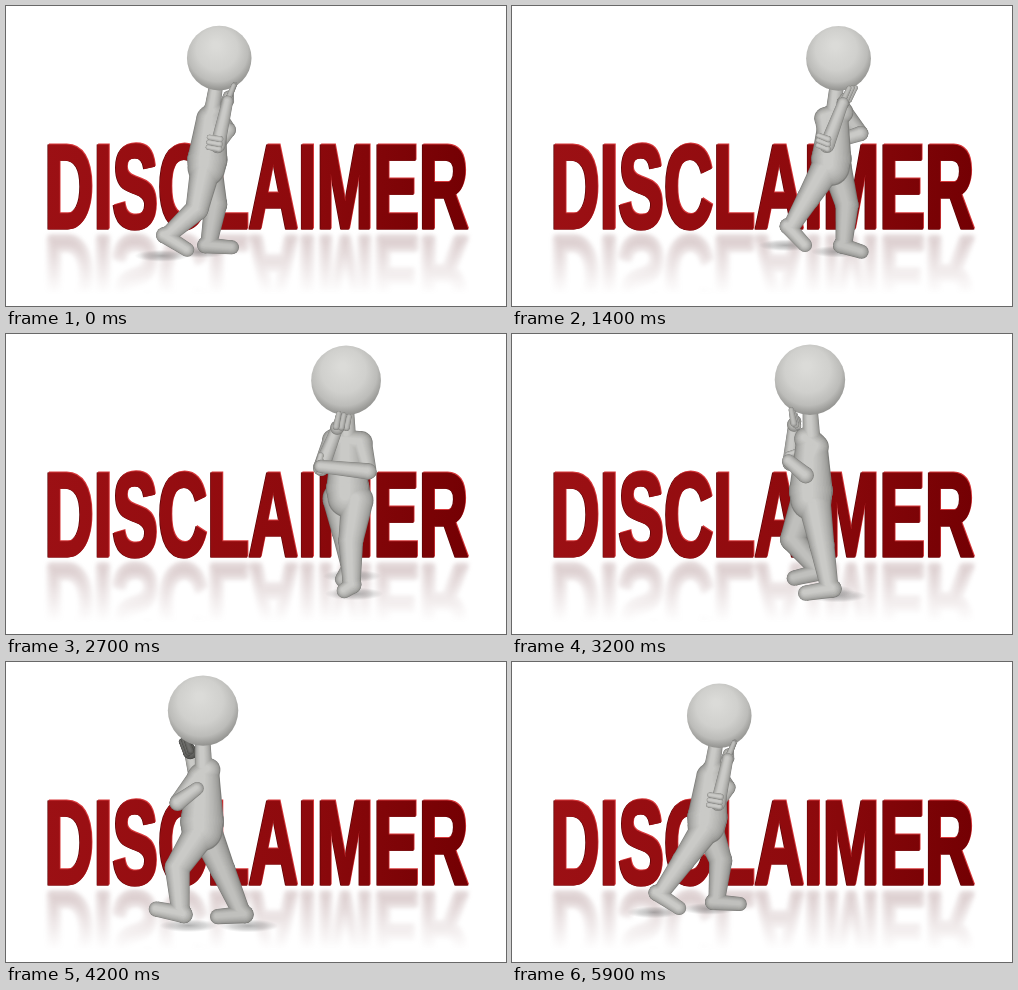
These frames come from a looping animation (500x300 px, 6 s). An HTML page with a canvas:

```html
<!DOCTYPE html>
<html lang="en">
<head>
<meta charset="utf-8">
<title>Disclaimer</title>
<style>
  html, body { margin: 0; width: 100%; height: 100%; overflow: hidden; background: #fff; }
  canvas { display: block; }
</style>
</head>
<body>
<canvas id="stage" width="500" height="300"></canvas>
<script>
const LOOP = 6000, STEP = 100, STRIDE = 1500;
const ctx = document.getElementById('stage').getContext('2d');

// time, pelvis x, ground y, scale, heading in degrees (0 right, 90 to viewer), lean
const PATH = [
  [0, 200, 250, 1, 8, 13],
  [900, 271, 248, 1, 8, 14],
  [1500, 328, 248.5, 1.005, 50, 9],
  [1900, 362, 250, 1.015, 103, 3],
  [2300, 363, 253, 1.045, 104, 4],
  [2700, 342, 257, 1.08, 107, 6],
  [3200, 299, 263, 1.09, 158, 1],
  [3600, 258, 266, 1.1, 186, -2],
  [4200, 196, 263, 1.09, 200, -1],
  [4600, 160, 257, 1.06, 235, 2],
  [4900, 147, 253, 1.03, 280, 6],
  [5200, 149, 251, 1.01, 328, 10],
  [5500, 165, 250, 1, 355, 12],
  [5900, 194, 250.5, 1, 367, 13]
];

function keyAt(i) {
  const n = PATH.length, turn = Math.floor(i / n);
  const k = PATH[i - turn * n].slice();
  k[0] += turn * LOOP;
  k[4] += turn * 360;
  return k;
}

// Smooth cyclic interpolation through the path keys
function walkerAt(t) {
  let i = PATH.length - 1;
  while (PATH[i][0] > t) i--;
  const [a, b, c, d] = [-1, 0, 1, 2].map(o => keyAt(i + o));
  const span = c[0] - b[0], q = (t - b[0]) / span;
  const [x, ground, scale, heading, lean] = [1, 2, 3, 4, 5].map(j => {
    const m0 = (c[j] - a[j]) / (c[0] - a[0]) * span;
    const m1 = (d[j] - b[j]) / (d[0] - b[0]) * span;
    const rise = c[j] - b[j];
    return b[j] + q * (m0 + q * (3 * rise - 2 * m0 - m1 + q * (m0 + m1 - 2 * rise)));
  });
  return { x, ground, scale, heading: heading * Math.PI / 180, lean };
}

function makeLayer(paint) {
  const layer = document.createElement('canvas');
  layer.width = 500;
  layer.height = 300;
  paint(layer.getContext('2d'));
  return layer;
}

function word(g, dx, dy, fill, flip = 1) {
  g.save();
  g.translate(38.4 + dx, (flip > 0 ? 221.5 : 231) + dy);
  g.scale(1, 1.74 * flip);
  g.font = 'bold 68.1px "Liberation Sans", Arial, sans-serif';
  g.fillStyle = g.strokeStyle = fill;
  g.lineWidth = 1.8;
  g.fillText('DISCLAIMER', 0, 0);
  g.strokeText('DISCLAIMER', 0, 0);
  g.restore();
}

const backdrop = makeLayer(g => {
  const mirror = makeLayer(m => {
    m.filter = 'blur(2.5px)';
    word(m, 0, 0, '#8e6264', -0.95);
    m.filter = 'none';
    m.globalCompositeOperation = 'destination-in';
    const fade = m.createLinearGradient(0, 228, 0, 288);
    fade.addColorStop(0, 'rgba(0,0,0,.34)');
    fade.addColorStop(.5, 'rgba(0,0,0,.17)');
    fade.addColorStop(1, 'rgba(0,0,0,0)');
    m.fillStyle = fade;
    m.fillRect(0, 0, 500, 300);
  });
  g.fillStyle = '#fff';
  g.fillRect(0, 0, 500, 300);
  g.drawImage(mirror, 0, 0);
  const red = g.createLinearGradient(0, -48, 420, 0);
  red.addColorStop(0, '#9c1014');
  red.addColorStop(.6, '#8e0a0d');
  red.addColorStop(1, '#740003');
  word(g, -.7, .7, '#5c0406');
  word(g, .8, -.8, '#d8383a');
  word(g, 0, 0, red);
});

function cone(a, b, ra, rb) {
  const len = Math.hypot(b.x - a.x, b.y - a.y) || 1;
  const nx = (a.y - b.y) / len, ny = (b.x - a.x) / len;
  ctx.beginPath();
  ctx.arc(a.x, a.y, ra, 0, 7);
  ctx.fill();
  ctx.beginPath();
  ctx.arc(b.x, b.y, rb, 0, 7);
  ctx.fill();
  ctx.beginPath();
  ctx.moveTo(a.x + nx * ra, a.y + ny * ra);
  ctx.lineTo(b.x + nx * rb, b.y + ny * rb);
  ctx.lineTo(b.x - nx * rb, b.y - ny * rb);
  ctx.lineTo(a.x - nx * ra, a.y - ny * ra);
  ctx.fill();
}

// Paints joined limbs in shrinking, brightening layers so that seams blend
function paintLimbs(limbs, scale, shade = 1) {
  const layers = 14;
  for (let i = 0; i < layers; i++) {
    const q = i / (layers - 1);
    const tone = Math.round((126 + 76 * q ** .45) * shade);
    ctx.fillStyle = `rgb(${tone},${tone},${tone - 3})`;
    for (const [a, b, ra, rb] of limbs) {
      const move = (p, r) => ({ x: p.x - r * scale * q * .15, y: p.y - r * scale * q * .12 });
      const size = scale * (1 - q * .75);
      cone(move(a, ra), move(b, rb), ra * size, rb * size);
    }
  }
}

function paintHead(c, r) {
  const g = ctx.createRadialGradient(c.x - r * .1, c.y - r * .4, r * .1, c.x - r * .04, c.y - r * .16, r * 1.18);
  g.addColorStop(0, '#dbdbd8');
  g.addColorStop(.5, '#d0d0cd');
  g.addColorStop(.78, '#bcbcb9');
  g.addColorStop(1, '#8e8e8b');
  ctx.fillStyle = g;
  ctx.beginPath();
  ctx.arc(c.x, c.y, r, 0, 7);
  ctx.fill();
}

function paintShadow(p, scale) {
  ctx.save();
  ctx.translate(p.x, p.y);
  ctx.scale(27 * scale, 6 * scale);
  const g = ctx.createRadialGradient(0, 0, 0, 0, 0, 1);
  g.addColorStop(0, 'rgba(80,80,80,.45)');
  g.addColorStop(.6, 'rgba(100,100,100,.25)');
  g.addColorStop(1, 'rgba(120,120,120,0)');
  ctx.fillStyle = g;
  ctx.fillRect(-1, -1, 2, 2);
  ctx.restore();
}

// Ankle offset, ankle height and heel lift for a point in the stride
function gait(phase) {
  const stance = .54;
  if (phase < stance) {
    const q = phase / stance, heel = Math.max(0, (q - .65) / .35);
    return { f: 20 - 65 * q, u: 12 + 9 * heel * heel, pitch: -.5 * heel * heel };
  }
  const q = (phase - stance) / (1 - stance), ease = q * q * (3 - 2 * q);
  return {
    f: -45 + 65 * ease,
    u: 12 + 9 * (1 - q) ** 2 + 9 * Math.sin(Math.PI * q),
    pitch: -.5 * (1 - q) ** 2 - .2 * Math.sin(2 * Math.PI * q)
  };
}

function kneeOf(hip, ankle) {
  const bone = 38, df = ankle.f - hip.f, du = ankle.u - hip.u;
  const d = Math.hypot(df, du), bend = Math.sqrt(Math.max(0, bone * bone - d * d / 4));
  return { f: hip.f + df / 2 - du / d * bend, u: hip.u + du / 2 + df / d * bend };
}

function paintWalker(t) {
  const w = walkerAt(t), s = w.scale;
  const cos = Math.cos(w.heading), sin = Math.sin(w.heading);
  const bob = 1.5 * Math.cos(4 * Math.PI * (t - 150) / STRIDE);

  // forward, right and up to screen; z grows towards the viewer
  const at = (f, r, u) => {
    const z = f * sin + r * cos;
    return { x: w.x + s * (f * cos - r * sin), y: w.ground - s * u + s * z * .3, z };
  };
  const upper = (f, r, u) => at(f + w.lean * (u - 84) / 111, r, u + bob);

  const legs = [1, -1].map(side => {
    const phase = ((t - 5775 + (side > 0 ? STRIDE / 2 : 0)) / STRIDE + 8) % 1;
    const step = gait(phase), r = side * 9;
    const hip = { f: 0, u: 86 + bob }, knee = kneeOf(hip, step);
    const c = Math.cos(step.pitch), k = Math.sin(step.pitch);
    const sole = (f, u) => at(step.f + f * c - u * k, r, step.u + f * k + u * c);
    const hipAt = at(hip.f, r, hip.u), kneeAt = at(knee.f, r, knee.u);
    const ankle = at(step.f, r, step.u);
    return {
      depth: ankle.z + hipAt.z * 4,
      shadow: at(step.f - 8, r, 1),
      limbs: [
        [hipAt, kneeAt, 15, 11.5], [kneeAt, ankle, 11.5, 8.5],
        [ankle, sole(-4, -4), 8.5, 8], [sole(-4, -4), sole(23, -5), 8, 7]
      ]
    };
  }).sort((a, b) => a.depth - b.depth);
  legs.forEach(leg => paintShadow(leg.shadow, s));

  const shoulder = side => upper(-1, side * 13, 140);
  const elbowR = upper(11, 22, 117), handR = upper(14, 5, 157);
  const elbowL = upper(15, -25, 119), handL = upper(13, 22, 119);
  const arms = [[shoulder(1), elbowR, 10.5, 7.5], [shoulder(-1), elbowL, 10.5, 7.5]];
  const isNear = arm => arm[0].z > -7;

  const body = [
    [shoulder(1), shoulder(-1), 11, 11],
    [upper(-1, 0, 136), upper(0, 0, 96), 15, 20],
    [upper(0, 0, 96), upper(0, 0, 88), 20, 19],
    [upper(-1, 0, 146), upper(0, 0, 170), 8, 7],
    ...legs[1].limbs,
    ...arms.filter(isNear)
  ];
  const chinFingers = [-6, -1, 4].map((r, i) =>
    [upper(14, r + 2, 158), upper(18, r - 2, 170 + i), 3, 2.3]);
  const wrapFingers = [-5, 0, 5].map(u =>
    [upper(13, 23, 119 + u), upper(2, 25, 121 + u), 3, 2.5]);
  const chinDepth = handR.z + 8;

  const parts = [
    { z: -100, draw: () => paintLimbs(legs[0].limbs, s, .95) },
    { z: -50, draw: () => paintLimbs(arms.filter(arm => !isNear(arm)), s, .95) },
    { z: 0, draw: () => paintLimbs(body, s) },
    { z: .5, draw: () => paintHead(upper(0, 0, 198), 32.3 * s) },
    { z: elbowR.z, draw: () => paintLimbs([[elbowR, handR, 7.5, 5.5]], s) },
    { z: elbowL.z, draw: () => paintLimbs([[elbowL, handL, 7.5, 6]], s) },
    { z: handL.z + 2, draw: () => wrapFingers.forEach(f => paintLimbs([f], s)) },
    {
      z: chinDepth,
      draw: () => {
        const shade = chinDepth < 0 ? .55 : .94;
        paintLimbs([[handR, upper(14, 2, 161), 6.5, 5.5]], s, shade);
        chinFingers.forEach(f => paintLimbs([f], s, shade));
      }
    }
  ];
  parts.sort((a, b) => a.z - b.z).forEach(part => part.draw());
}

function frame(now) {
  const t = Math.floor(now % LOOP / STEP) * STEP;
  ctx.drawImage(backdrop, 0, 0);
  paintWalker(t);
  requestAnimationFrame(frame);
}
requestAnimationFrame(frame);
</script>
</body>
</html>
```
